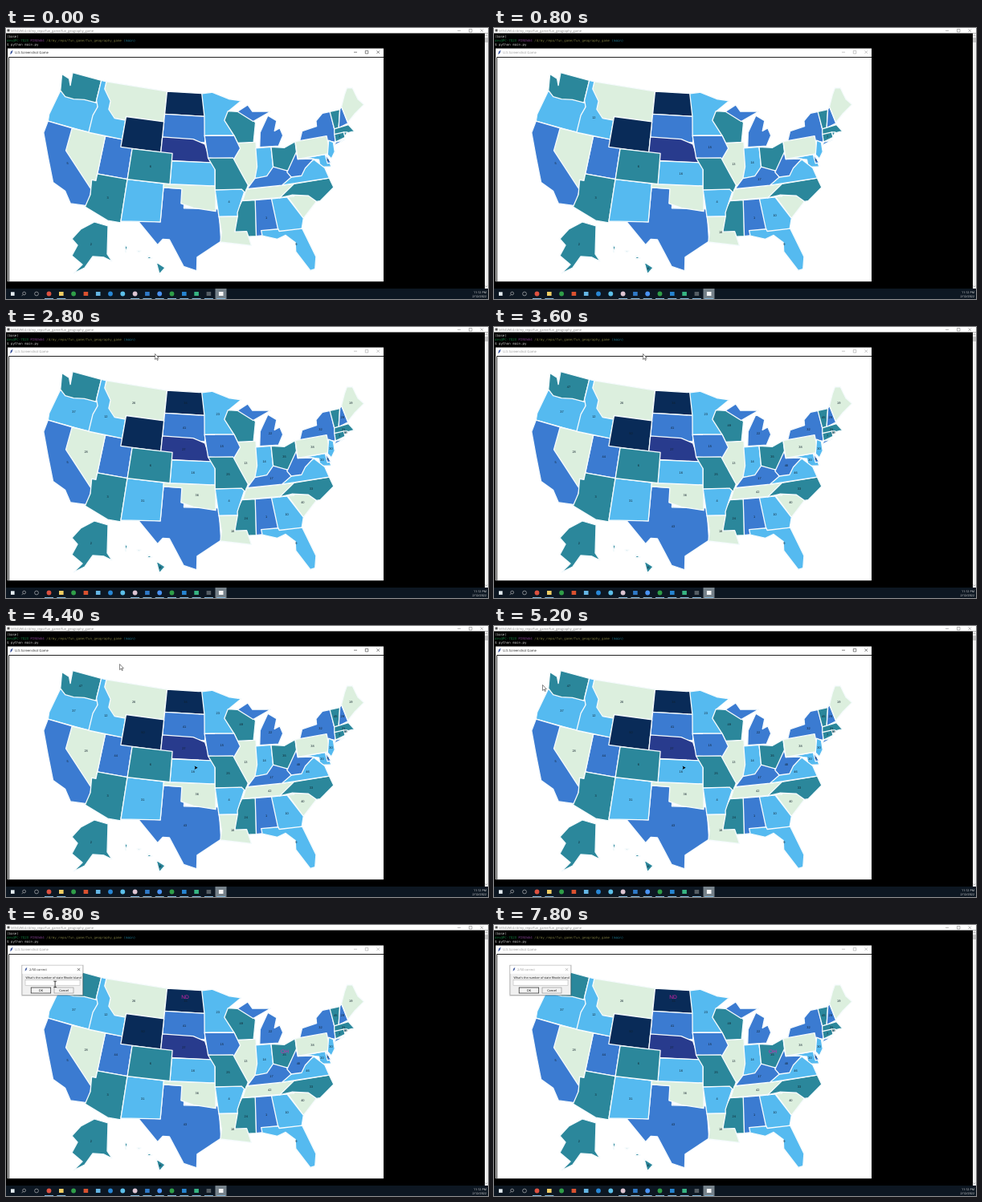
Write an HTML page that moves like this. It is 600 by 338 pixels and loops after 8000 ms.

```html
<!DOCTYPE html>
<html lang="en">
<head>
<meta charset="utf-8">
<title>Geography game</title>
<style>
  html, body { margin: 0; width: 100%; height: 100%; overflow: hidden; background: #000; }
  svg { display: block; width: 100vw; height: 100vh; font: 4.2px "Open Sans", "Noto Sans", sans-serif; text-rendering: geometricPrecision; }
  .mono { font: 4.1px "DejaVu Sans Mono", monospace; }
  .state { stroke: #f6fbfd; stroke-width: 1.3; stroke-linejoin: round; }
  .label { font: 3.9px "Liberation Sans", sans-serif; text-anchor: middle; fill: #10202c; }
  .answer { font: 6.6px "Liberation Sans", sans-serif; text-anchor: middle; fill: #d524a8; }
  .glyph { fill: none; stroke-width: .55; }
  .mid { text-anchor: middle; }
</style>
</head>
<body>
<svg viewBox="0 0 600 338" preserveAspectRatio="none">
  <g id="terminal">
    <rect width="600" height="6.5" fill="#fff"/>
    <rect x="1.5" y="1.5" width="3" height="3" fill="#555"/>
    <text x="6" y="4.8" font-size="4" fill="#888">MINGW64:/d/my_repo/fun_game/fun_geography_game</text>
    <path class="glyph" stroke="#777" d="M562 3.3h4M576.5 1.5h3.5v3.5h-3.5zM590.5 1.5l3.5 3.5m0-3.5l-3.5 3.5"/>
    <rect x="596" y="6.5" width="4" height="319" fill="#f0f0f0"/>
    <rect x="596" y="12" width="4" height="6" fill="#c4c4c4"/>
    <path class="glyph" stroke="#777" d="M596.5 10l1.3-1.4 1.3 1.4M596.5 321.5l1.3 1.4 1.3-1.4"/>
    <g class="mono" fill="#ccc">
      <text x="1" y="11.5">(base)</text>
      <text x="1" y="16.6" fill="#13753c">dev@PC-7Q2X <tspan fill="#71377c">MINGW64</tspan> <tspan fill="#77753d">/d/my_repo/fun_game/fun_geography_game</tspan> <tspan fill="#1c7992">(main)</tspan></text>
      <text x="1" y="21.7">$ python main.py</text>
    </g>
  </g>

  <g id="game">
    <rect x="2" y="25.5" width="468" height="290.7" fill="#fff"/>
    <path d="M470 36.5H3.5V316" fill="none" stroke="#222"/>
    <path d="M5 33l1-3.5 2.5-2-1 3.8z" fill="#36509a"/>
    <g id="gameTitle">
      <text x="11" y="32.1">U.S.Screenshot Game</text>
      <path class="glyph" stroke="currentColor" d="M433 30.2h4M447.3 28.4h3.5v3.5h-3.5zM461.5 28.3l3.6 3.6m0-3.6l-3.6 3.6"/>
    </g>
    <g id="map"></g>
    <g id="labels"></g>
    <path id="turtle" d="M234.5 174.6l4.2 2.2-4.2 2.2 1-2.2z"/>
    <text id="northDakota" class="answer" x="223" y="92.4">ND</text>
    <text id="ohio" class="answer" x="347" y="160.3">OH</text>
  </g>

  <g id="dialog">
    <rect x="19" y="49.5" width="78" height="39.5" rx="1" opacity=".12"/>
    <rect x="20" y="50.3" width="75.5" height="37" fill="#f0f0f0" stroke="#888" stroke-width=".5"/>
    <rect x="20.3" y="50.5" width="75" height="10.3" fill="#fff"/>
    <path d="M23.5 57.5l.8-3 2-1.7-.8 3.2z" fill="#36509a"/>
    <g id="dialogTitle">
      <text id="score" x="29" y="57" font-size="3.9"></text>
      <path class="glyph" stroke="currentColor" d="M89 53.9l3.2 3.2m0-3.2l-3.2 3.2"/>
    </g>
    <text id="question" x="24.5" y="66.6" font-size="3.65" fill="#111"></text>
    <rect x="24" y="68.5" width="68" height="6.7" fill="#fff" stroke="#aaa" stroke-width=".5"/>
    <rect x="31.2" y="78" width="24.5" height="7" fill="#f3f3f3" stroke="#222" stroke-width=".7"/>
    <rect x="60" y="78" width="24" height="7" fill="#f3f3f3" stroke="#888" stroke-width=".6"/>
    <text class="mid" x="43.5" y="82.9" font-size="3.8">OK</text>
    <text class="mid" x="72" y="82.9" font-size="3.8">Cancel</text>
  </g>
  <path id="arrow" d="M0 0v7l1.7-1.5 1.2 2.6 1-.5-1.2-2.4h2.2z" fill="#fff" stroke="#111" stroke-width=".5"/>
  <path id="beam" d="M59.3 70.2h3.6M61.1 70.2v7.2M59.3 77.4h3.6" fill="none" stroke="#111" stroke-width=".8"/>

  <g id="taskbar">
    <rect y="325" width="600" height="13" fill="#0d1722"/>
    <rect x="260.5" y="325" width="14" height="13" fill="#75818a"/>
    <rect x="6" y="329.3" width="4.6" height="4.6" fill="#e5edf2"/>
    <g class="glyph" stroke="#ddd"><circle cx="22.6" cy="331" r="1.9"/><path d="M21.2 332.5l-1.6 1.7"/><circle cx="38" cy="331.5" r="2.4"/></g>
    <g id="icons"></g>
    <g fill="#eee" font-size="3.7" text-anchor="end"><text x="598" y="330.6">11:12 PM</text><text x="598" y="336">2/12/2022</text></g>
  </g>
</svg>
<script>
const $ = id => document.getElementById(id);
const FRAME = 200, LOOP = 8000;
const colors = { teal: '#2b879b', sky: '#55baf0', blue: '#3b7bd1', mint: '#dcefde', navy: '#092b58', indigo: '#283b8d' };
const labels = [];

function add(parent, tag, attributes, text = '') {
  const node = document.createElementNS('http://www.w3.org/2000/svg', tag);
  for (const key in attributes) node.setAttribute(key, attributes[key]);
  node.textContent = text;
  return parent.appendChild(node);
}

// Albers equal-area conic: degrees west and north to stage pixels.
function albers([west, north]) {
  const rad = Math.PI / 180, n = .6029;
  const rho = Math.sqrt(1.3492 - 2 * n * Math.sin(north * rad)) / n;
  const theta = n * (94.5 - west) * rad;
  return [261 + 552 * rho * Math.sin(theta), 545.5 * rho * Math.cos(theta) - 517.5];
}

function centroid(points) {
  let area = 0, x = 0, y = 0;
  points.forEach(([ax, ay], i) => {
    const [bx, by] = points[(i + 1) % points.length];
    const cross = ax * by - bx * ay;
    area += cross; x += (ax + bx) * cross; y += (ay + by) * cross;
  });
  return [x / area / 3, y / area / 3];
}

function state(number, color, outline, place = albers) {
  const parts = outline.split('/').map(part => part.split(',').map(p => place(p.trim().split(' ').map(Number))));
  const [x, y] = centroid(parts[0]);
  add($('map'), 'path', { class: 'state', fill: colors[color], d: parts.map(p => `M${p.join(' ')}Z`).join('') });
  labels[number] = add($('labels'), 'text', { class: 'label', x, y: y + 1.4 }, number);
}
const box = (number, color, west, north, east, south) =>
  state(number, color, `${west} ${north},${east} ${north},${east} ${south},${west} ${south}`);

// Later states cover the rough edges of earlier ones, so each border is given once.
box(26, 'mint', 116, 49, 104, 44.4);
box(34, 'navy', 104, 49, 96.5, 46);
box(41, 'blue', 104, 46, 96.4, 42.6);
state(37, 'sky', '124 46.2, 116.5 46, 116.5 42, 124.4 42, 124.6 42.9');
state(47, 'teal', '124.7 48.4, 123.1 48.1, 122.5 47.3, 122.8 49, 117 49, 117 46, 119.2 46, 121.2 45.7, 122.8 45.7, 124 46.3');
state(5, 'blue', '124.4 42, 119.5 42, 114.4 35, 114.4 32.7, 117.1 32.5, 118.4 33.9, 120.6 34.6, 122.5 37.5, 124.5 40.4');
box(44, 'blue', 114, 42, 109, 37);
state(28, 'mint', '120 42, 114 42, 114 36.1, 114.6 36.1, 114.6 35, 120 39');
state(12, 'sky', '117 49, 116 49, 116 48, 114.4 46.6, 114.4 45.5, 113 44.5, 111 44.5, 111 42, 117 42, 117 44.3, 116.5 45.5, 117 46.3');
box(50, 'navy', 111, 45, 104, 41);
state(3, 'teal', '114 37, 109 37, 109 31.3, 111 31.3, 114.8 32.5, 114.4 34.2, 114.7 36.1, 114 36.1');
state(43, 'blue', '106.5 31.9, 103 32, 103 36.5, 99.5 36.5, 99.5 34, 94 34, 93.7 29.8, 97.2 27.7, 97.2 25.9, 99.1 26.4, 101.4 29.8, 102.4 29.8, 103.1 29');
state(31, 'sky', '109 37, 103 37, 103 32, 109 31.5');
state(36, 'mint', '103 37, 94.5 37, 94.5 33.7, 98 34.1, 100 34.6, 100 36.5, 103 36.5');
state(27, 'indigo', '104 43, 98.5 43, 96.4 42.4, 95.3 40, 104 40');
box(16, 'sky', 102, 40, 94.6, 37);
box(6, 'teal', 109, 41, 102, 37);
state(23, 'sky', '97.2 49, 95.2 49.2, 92 48.3, 89.6 48, 92.1 46.7, 91 43.5, 96.5 43.5, 96.6 46');
box(13, 'mint', 91.4, 42.5, 87.4, 37);
state(49, 'teal', '92.2 46.7, 90.4 46.6, 88.1 45.9, 87.2 45, 87.8 42.5, 90.6 42.5, 91.2 43.5, 92.9 45.5');
state(15, 'blue', '96.5 43.5, 91.2 43.5, 90.2 41.8, 91.4 40.4, 95.8 40.6');
state(24, 'teal', '90.3 35, 88.1 35, 88.4 30.3, 91.6 30.3, 91.6 33');
state(4, 'sky', '94.6 36.5, 89.7 36.5, 91.1 33.5, 91.1 33, 94 33');
state(18, 'mint', '94 33, 91.1 33, 91.6 31, 89.8 31, 89.2 29.1, 93.8 29.7, 93.6 31');
state(25, 'teal', '95.8 40.6, 91.5 40.6, 90.2 38.6, 89.2 37, 89.7 36, 90.3 36.5, 94.6 36.5, 94.6 39.1');
state(1, 'blue', '88.2 35, 85 35, 85 30.4, 88.4 30.3');
state(40, 'mint', '83.1 35.2, 79.5 35, 78.6 33.9, 81 32');
state(10, 'sky', '85.6 35, 83.1 35, 81 32, 81.5 30.6, 85 30.6');
state(9, 'sky', '87.6 31, 85 31, 84.9 30.7, 81.4 30.7, 80 26.8, 80.4 25.2, 81.1 25.1, 82.8 27.8, 82.7 29, 84 30.1, 85.3 29.7, 87.5 30.3');
state(42, 'mint', '90.2 35, 82 35, 81.7 36.6, 89.5 36.5');
state(33, 'teal', '84.3 35, 81.7 36.6, 75.9 36.6, 75.5 35.3, 78 33.9, 78.6 33.9, 79.7 34.8, 82.3 35.2');
state(20, 'sky', '79.5 39.7, 75.6 39.7, 75.2 38, 77 38.2, 77 39.2');
state(8, 'blue', '75.8 39.8, 75.1 38.5, 75.7 38.5');
state(46, 'sky', '83.7 36.6, 75.9 36.6, 76.3 38, 77.8 39.3, 82 38');
state(14, 'sky', '87.5 41.7, 84.8 41.7, 84.8 38, 88 37.8, 87.5 39.3');
state(35, 'teal', '84.8 41.7, 82.5 41.4, 80.5 42, 80.6 39.5, 82.4 38.4, 84.8 38.7');
state(17, 'blue', '89.4 36.5, 83.7 36.6, 82 37.5, 82.6 38.4, 84.8 39.1, 86 38, 88 37.8');
state(48, 'blue', '82.6 38.2, 80.6 40.6, 80.5 39.7, 77.8 39.4, 79.5 38.4, 80.3 37.5, 82 37.5');
state(22, 'blue', '86.8 41.8, 83.5 41.7, 82.5 43, 82.9 44, 83.9 43.7, 83.3 45, 84.8 45.8, 86.5 43.7 / 90.4 46.6, 88.4 47.4, 87.6 46.5, 84.2 46.3, 87.6 45.2');
state(32, 'blue', '79.8 41.8, 79 43.2, 76.3 43.5, 76.2 44.2, 74.8 45, 73.3 45, 73.3 42, 73.7 41, 75 41.4 / 74 40.6, 72 41, 73.5 41');
box(38, 'mint', 80.5, 42, 74.9, 39.7);
state(30, 'sky', '74.7 41.4, 74 41, 74.1 39.8, 74.9 39, 75.4 39.6');
state(45, 'teal', '73.4 45, 71.5 45, 72.5 42.7, 73.3 42.7');
state(29, 'blue', '71.5 45, 71.1 45.3, 70.7 43, 72.5 42.7');
state(19, 'mint', '71.1 45.3, 70 46.7, 69.2 47.5, 68.2 47.3, 67.8 45.7, 67 44.8, 69 44, 70.7 43.1');
state(21, 'teal', '73.3 42.7, 70.7 42.8, 70 41.8, 71.2 41.8, 73.5 42');
state(7, 'teal', '73.5 42, 71.8 42, 71.8 41.3, 73.6 41');
state(39, 'teal', '71.8 42, 71.2 41.9, 71.8 41.4');

// The two inset states are placed in stage pixels.
const inset = point => point;
state(2, 'teal', '93 251, 110 242, 127 247, 126 282, 132 291, 122 286, 108 285, 98 299, 84 306, 95 295, 82 284, 89 271, 82 263', inset);
state(11, 'teal', '187 292, 198 299, 191 307 / 176 284, 182 287, 177 288 / 163 278, 168 278, 165 280 / 148 271, 151 273, 149 280', inset);

const round = [0, 2, 5, 6, 7, 9, 10], running = [0, 1, 7, 8, 9, 10, 11, 12, 13, 14];
'#dd5140 #f0cd63 #2f9e48 #d9512f #65b6e5 #2787d6 #5cc0ea #ddc5d2 #2f79c7 #4a93f5 #2f9e48 #2684d0 #37b482 #555e65 #f8f8f8'
  .split(' ').forEach((fill, i) => {
    const x = 53.5 + i * 15.3, icons = $('icons');
    if (round.includes(i)) add(icons, 'circle', { cx: x, cy: 331.5, r: 2.9, fill });
    else add(icons, 'rect', { x: x - 2.8, y: 329, width: 5.6, height: 5, fill });
    if (running.includes(i)) add(icons, 'rect', { x: x - 5.5, y: 337, width: 11, height: 1, fill: '#86b9dc' });
  });

const show = (id, visible) => $(id).style.display = visible ? '' : 'none';
const setActive = (id, active) => $(id).style.color = $(id).style.fill = active ? '#222' : '#999';

function render(time) {
  const t = Math.floor(time % LOOP / FRAME) * FRAME;
  const numbered = Math.floor(9.5 + 2.32 * t / FRAME);
  const correct = (t >= 5800) + (t >= 6400);
  const asking = t >= 5400;

  labels.forEach((label, number) => label.style.display = number <= numbered ? '' : 'none');
  setActive('gameTitle', t < 600 || t >= 4000 && !asking);
  show('turtle', t >= 3800 && !asking);
  show('northDakota', correct > 0);
  show('ohio', correct > 1);

  show('dialog', asking);
  setActive('dialogTitle', t < 7400);
  $('score').textContent = `${correct}/50 correct`;
  $('question').textContent = "What's the number of state " + ['North Dakota', 'Ohio', 'Rhode Island'][correct];

  const travel = Math.min(1, Math.max(0, (t - 4000) / 1000));
  const ease = travel * travel * (3 - 2 * travel);
  show('arrow', t >= 2400 && !asking);
  $('arrow').setAttribute('transform', `translate(${185.5 - 125 * ease} ${33.5 + 40 * ease})`);
  show('beam', asking && t < 7400);
}

function tick() {
  render(performance.now());
  requestAnimationFrame(tick);
}
tick();
</script>
</body>
</html>
```
